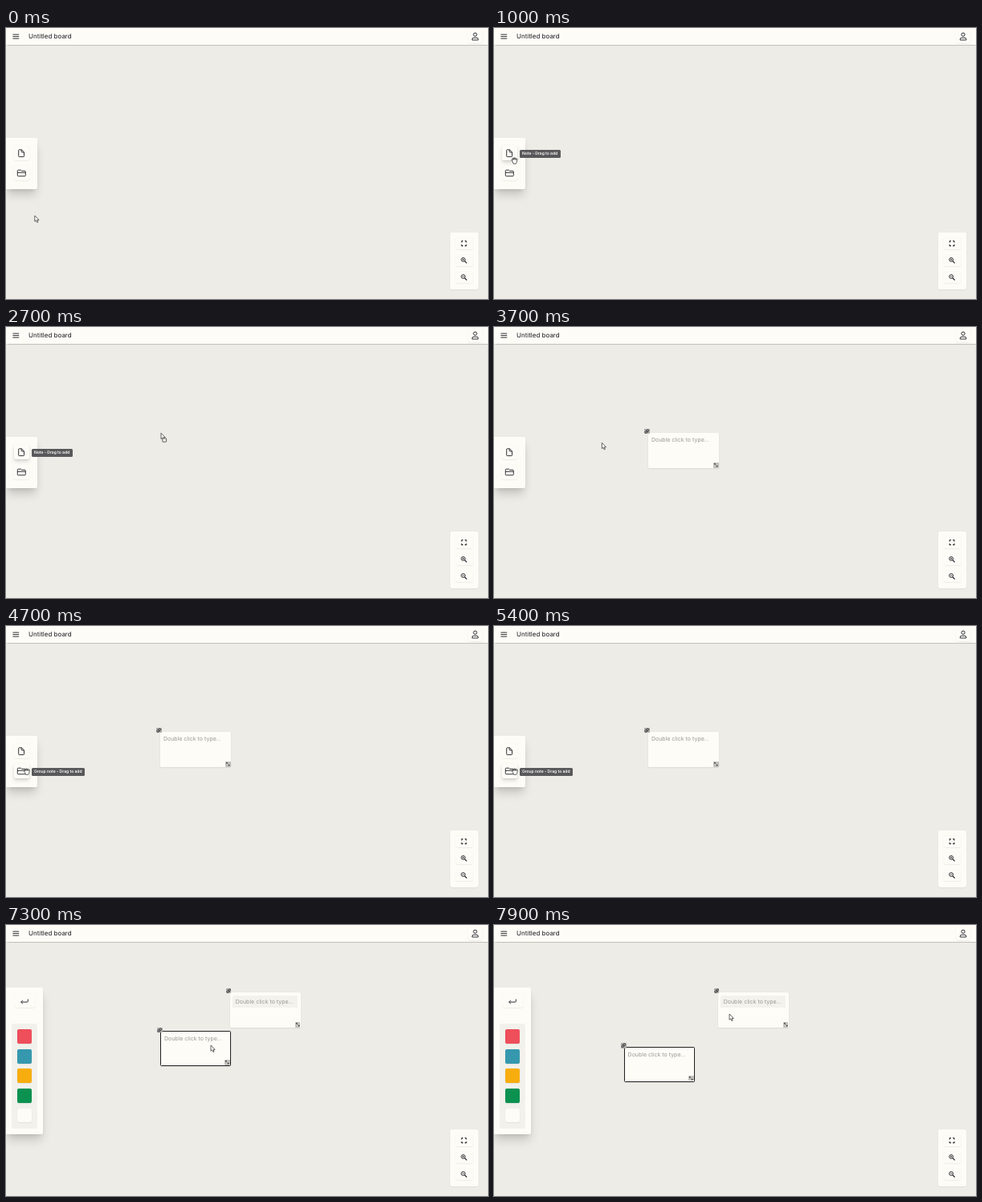
Animation, 600 px wide and 338 px high, one loop 8 s. Source, as an HTML page:

```html
<!DOCTYPE html>
<html lang="en">
<head>
<meta charset="utf-8">
<title>Board</title>
<style>
  html, body { margin: 0; width: 100%; height: 100%; overflow: hidden; background: #edece7; }
  body { font-family: Inter, sans-serif; text-rendering: geometricPrecision; color: #1c1c22; cursor: default; }
  div, svg { position: absolute; box-sizing: border-box; white-space: nowrap; }
  svg { left: 0; top: 0; width: 100%; height: 100%; overflow: visible; fill: none; stroke: #1c1c22; stroke-width: .9; stroke-linejoin: round; }
  [hidden] { display: none; }
  .head { left: 0; top: 0; width: 600px; height: 21px; background: #fdfcf7; box-shadow: 0 .5px 1px #0000002e; }
  .title { left: 28px; font-size: 8px; line-height: 21px; }
  .panel { background: #fdfcf7; border-radius: 0 2px 2px 0; box-shadow: 0 9px 12px -2px #0000002b, 0 3px 5px -2px #0000001a; }
  .zoom { left: 553px; top: 255.3px; width: 35px; height: 70.4px; border-radius: 2px; box-shadow: 0 .5px 1.5px #00000018; }
  .btn { background: #fdfcf7; border-radius: 2px; box-shadow: 0 .6px 1.4px #0000001c; }
  .btn.hover { box-shadow: 0 3px 5px #00000022, 0 1px 2px #00000014; }
  .tip { left: 31.5px; height: 10.5px; padding: 0 3.4px; border-radius: 1.5px; background: #59595b; color: #fff;
         font-size: 5px; font-weight: 600; line-height: 10.5px; }
  .note { width: 88px; height: 44px; background: #fdfcf7; border-radius: 1.5px; box-shadow: 0 .6px 1.6px #0000001e; }
  .note.on { border: 1.3px solid #222; }
  .text { left: 3.6px; top: 4.2px; font-size: 7.03px; line-height: 9px; color: #999893; }
  .group .text { left: 7px; top: 7.4px; }
  .field { left: 3.5px; top: 3.8px; width: 81px; height: 15.2px; border-radius: 1.5px; background: #f3f2ed; }
  .chip { width: 6.4px; height: 6.4px; background: #c2c1bc; border-radius: 1px; }
  .chip svg { stroke-width: .7; }
  .link { left: -4.9px; top: -5.3px; background: #a9a8a4; }
  .size { right: .5px; bottom: .3px; }
</style>
</head>
<body>
<div class="head">
  <div class="title">Untitled board</div>
  <div class="btn" style="left:575px;top:2px;width:18px;height:17px"></div>
  <svg><path d="M8.4 8.1h7.8M8.4 10.6h7.8M8.4 13.1h7.8"/>
    <circle cx="584" cy="8.2" r="2.1"/><path d="M580.2 15v-.7q0-2.1 2.1-2.1h3.4q2.1 0 2.1 2.1v.7z"/></svg>
</div>

<div class="note" id="note" hidden>
  <div class="text">Double click to type...</div>
</div>
<div class="note group" id="group" hidden>
  <div class="field"></div><div class="text">Double click to type...</div>
</div>

<div class="panel" id="tools" style="left:0;top:137.4px;width:38.7px;height:63.2px">
  <div class="btn" id="addNote" style="left:10px;top:10px;width:18.5px;height:18px"></div>
  <div class="btn" id="addGroup" style="left:10px;top:35px;width:18.5px;height:18px"></div>
  <svg>
    <path d="M15.7 15.6v7.2q0 .8.8.8h5.2q.8 0 .8-.8v-4.9l-3.1-3.1h-2.9q-.8 0-.8.8zM19.2 14.9v2.4q0 .7.7.7h2.5"/>
    <path d="M14.3 41.3v5.5q0 1 1 1h8q1 0 1-1v-4.5q0-1-1-1h-3.6l-1.3-1.1h-3.1q-1 0-1 1.1zM14.3 43.3h10"/>
  </svg>
</div>

<div class="panel" id="colors" style="left:0;top:77.7px;width:46px;height:183px" hidden>
  <div class="btn" style="left:10.5px;top:8.5px;width:25px;height:16.5px"></div>
  <div id="swatches" style="left:7px;top:45.8px;width:32px;height:130.5px;border-radius:2px;background:#f2f1ec"></div>
  <svg><path d="M27.4 14.6v2.2q0 1.3-1.3 1.3h-7.4M20.8 16l-2.1 2.1 2.1 2.1"/></svg>
</div>

<div class="panel zoom">
  <div class="btn" style="left:7px;top:6.5px;width:20.5px;height:14.3px"></div>
  <div class="btn" style="left:7px;top:27.6px;width:20.5px;height:14.3px"></div>
  <div class="btn" style="left:7px;top:48.7px;width:20.5px;height:14.3px"></div>
  <svg>
    <path stroke-width="1.1" d="M14.2 12.6v-1.9h1.9M18 10.7h1.9v1.9M19.9 14.9v1.9h-1.9M16.1 16.8h-1.9v-1.9"/>
    <g id="lens"><circle cx="16.1" cy="33.9" r="2.4"/><path stroke-width="1.2" d="M17.9 35.7l2.7 2.7"/><path stroke-width=".7" d="M14.9 33.9h2.4"/></g>
    <path stroke-width=".7" d="M16.1 32.7v2.4"/>
    <use href="#lens" y="21.1"/>
  </svg>
</div>

<div class="tip" id="noteTip" style="top:151.7px" hidden>Note - Drag to add</div>
<div class="tip" id="groupTip" style="top:176.5px" hidden>Group note - Drag to add</div>

<svg><g id="cursor" fill="#fff" stroke="#333" stroke-width=".75">
  <g id="arrow"><path d="M0 0V7.3L1.7 5.8 2.9 8.5 4.1 8 3 5.4H5.2Z"/>
    <rect id="badge" x="1.8" y="6.6" width="4.8" height="4.4" rx=".6" fill="#edece7"/></g>
  <path id="hand" d="M-2.6.6L-3.6-.6Q-4.2-1.6-3.2-1.7L-1.9-.6-2.5-2.8Q-2.4-3.7-1.6-3.2L-.9-1.3V-3.6Q-.3-4.4.3-3.6V-1.3L.9-3.3Q1.7-3.9 2-3L1.6-1 2.5-2.2Q3.4-2.6 3.4-1.6L2.7 1.8 1.8 3.8H-1.3Z"/>
</g></svg>

<script>
const el = id => document.getElementById(id);
const LOOP = 8000;

// Cursor stops: time, x, y
const stops = [
  [0, 35.8, 234], [860, 25.5, 165.5], [1860, 25.5, 165.5], [2620, 193, 132.3], [2880, 193, 132.3],
  [3600, 134.3, 144.4], [3720, 134.3, 144.4], [4550, 26, 181.6], [5480, 26, 181.6],
  [6450, 279.3, 84.6], [6700, 279.3, 84.6], [7230, 255, 150], [7300, 255, 150],
  [7560, 225, 170], [7880, 293, 111], [LOOP, 293, 111]
];

const ease = p => p * p * (3 - 2 * p);
const progress = (t, a, b) => ease(Math.min(1, Math.max(0, (t - a) / (b - a))));
const within = (t, ...spans) => spans.some(([a, b]) => t >= a && t < b);
const show = (id, on) => el(id).toggleAttribute('hidden', !on);
const place = (id, x, y) => { el(id).style.left = x + 'px'; el(id).style.top = y + 'px'; };

function cursorAt(t) {
  const i = stops.findIndex(s => s[0] > t);
  const [a, b] = [stops[i - 1], stops[i]];
  const p = progress(t, a[0], b[0]);
  return [a[1] + (b[1] - a[1]) * p, a[2] + (b[2] - a[2]) * p];
}

['#ef4e5b', '#3598ae', '#f8ad0e', '#0b9250', '#fdfcf7'].forEach((color, i) => {
  el('swatches').insertAdjacentHTML('beforeend',
    `<div class="btn" style="left:7px;top:${6.7 + i * 24.65}px;width:17.7px;height:17.7px;background:${color}"></div>`);
});

for (const id of ['note', 'group']) {
  el(id).insertAdjacentHTML('beforeend', `
    <div class="chip link"><svg><g transform="rotate(-45 3.2 3.2)"><rect x=".4" y="2" width="3.2" height="2.4" rx="1.2"/><rect x="2.8" y="2" width="3.2" height="2.4" rx="1.2"/></g></svg></div>
    <div class="chip size"><svg><path d="M1.4 2.6V1.4H2.6M1.4 1.4L2.7 2.7M5 3.8V5H3.8M5 5L3.7 3.7"/></svg></div>`);
}
place('group', 278.7, 83.9);

function draw() {
  const t = performance.now() % LOOP;
  const hand = within(t, [780, 1880], [4480, 5480]);
  const colors = within(t, [2880, 3680], [6700, LOOP]);

  const [x, y] = cursorAt(t);
  el('cursor').setAttribute('transform', `translate(${x} ${y})`);
  el('hand').style.display = hand ? '' : 'none';
  el('arrow').style.display = hand ? 'none' : '';
  el('badge').style.display = within(t, [1880, 2880], [5480, 6700]) ? '' : 'none';

  show('tools', !colors);
  show('colors', colors);
  show('noteTip', within(t, [970, 2880]));
  show('groupTip', within(t, [4650, 6700]));
  el('addNote').classList.toggle('hover', within(t, [800, 2880]));
  el('addGroup').classList.toggle('hover', within(t, [4480, 6700]));

  const moved = progress(t, 7300, 7560);
  place('note', 192.3 - 30.3 * moved, 131.8 + 19.7 * moved);
  show('note', t >= 2880);
  show('group', t >= 6700);
  el('note').classList.toggle('on', within(t, [2880, 3680], [7300, LOOP]));
  el('group').classList.toggle('on', within(t, [6700, 7300]));
  requestAnimationFrame(draw);
}
draw();
</script>
</body>
</html>
```
